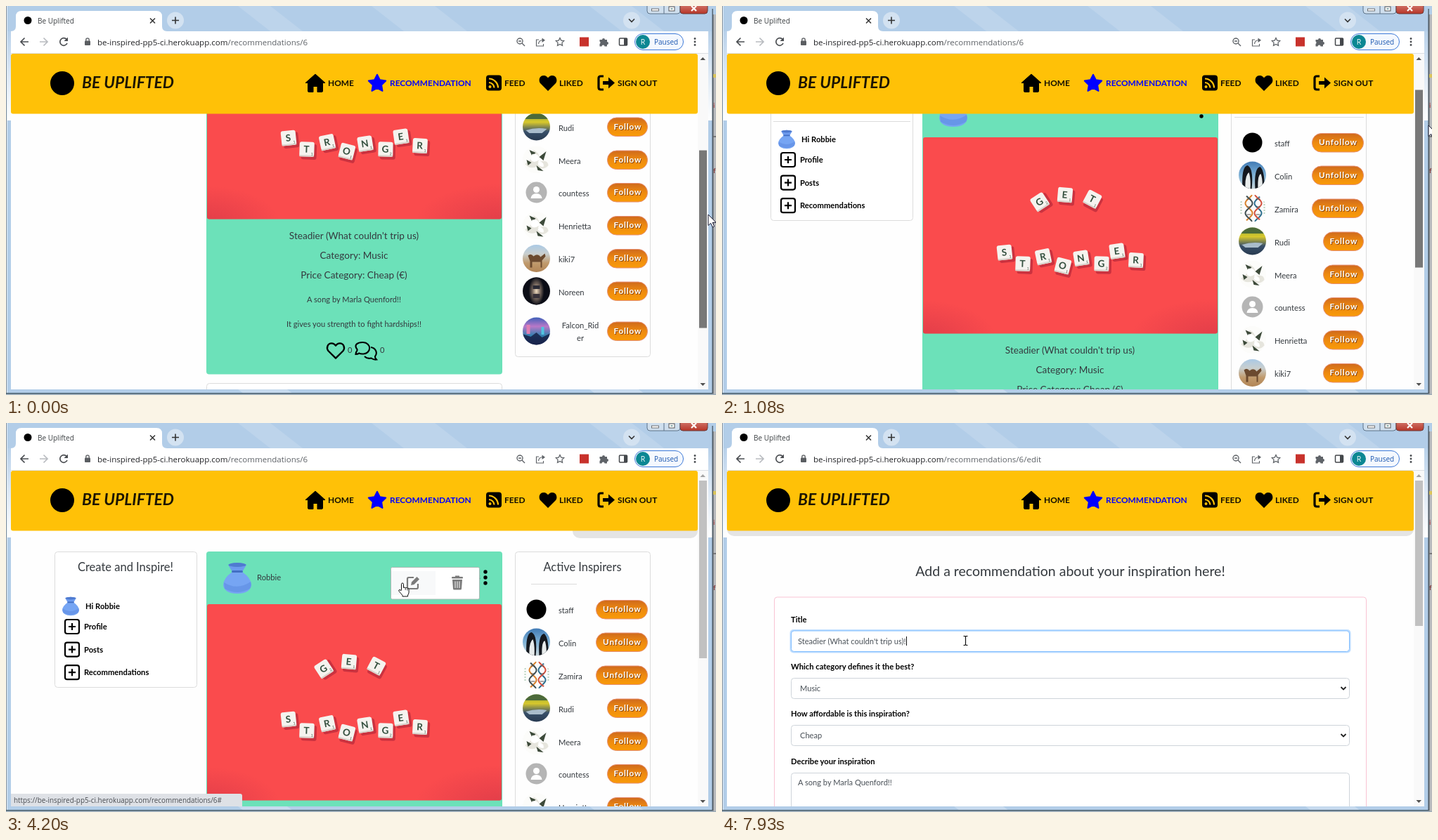
Write an HTML page that moves like this. It is 1010x554 px and loops after 8 s.

```html
<!DOCTYPE html>
<html lang="en">
<head>
<meta charset="utf-8">
<title>Be Uplifted</title>
<style>
html,body{margin:0;width:100%;height:100%;overflow:hidden;background:#fff}
svg{display:block;width:1010px;height:554px;font-family:Lato,sans-serif}
.ui{font-family:"Open Sans","Noto Sans",sans-serif}
.b{font-weight:700}
.m{text-anchor:middle}
.e{text-anchor:end}
text{white-space:pre}
</style>
</head>
<body>
<svg id="stage" viewBox="0 0 1010 554" xmlns="http://www.w3.org/2000/svg"></svg>
<script>
const INK = '#34393e', SONG = "Steadier (What couldn't trip us)", ME = 'Robbie';
const URL_HOST = 'be-inspired-pp5-ci.herokuapp.com', URL_PATH = '/recommendations/6';

// markup helpers
const text = (x, y, s, size = 11.1, cls = '', fill = INK, more = '') =>
  `<text x="${x}" y="${y}" font-size="${size}" class="${cls}" fill="${fill}" ${more}>${s}</text>`;
const rect = (x, y, w, h, fill, r = 0, more = '') =>
  `<rect x="${x}" y="${y}" width="${w}" height="${h}" rx="${r}" fill="${fill}" ${more}/>`;
const box = (x, y, w, h, stroke, r = 4, fill = '#fff', more = '') =>
  rect(x + .5, y + .5, w - 1, h - 1, fill, r, `stroke="${stroke}" ${more}`);
const circle = (x, y, r, fill, more = '') => `<circle cx="${x}" cy="${y}" r="${r}" fill="${fill}" ${more}/>`;
const path = (d, fill = 'none', more = '') => `<path d="${d}" fill="${fill}" ${more}/>`;
const line = (d, stroke, w = 1, more = '') => path(d, 'none', `stroke="${stroke}" stroke-width="${w}" ${more}`);
const group = (x, y, body, more = '') => `<g transform="translate(${x} ${y}) ${more}">${body}</g>`;
const grad = (id, ...stops) => `<linearGradient id="${id}" x2="0" y2="1">` +
  stops.map((c, i) => `<stop offset="${i / (stops.length - 1)}" stop-color="${c}"/>`).join('') + '</linearGradient>';

const HEART = 'M0 11L-11 0C-14-4-12-11-6-11C-3-11-1-9 0-7.5C1-9 3-11 6-11C12-11 14-4 11 0Z';

const defs = `<defs>
${grad('edge', '#b8d1ea', '#dfeaf5', '#ffffff')}
${grad('btn', '#cf6a1c', '#ee8a10', '#f99b08')}
${grad('shut', '#d98a80', '#b73527')}
${grad('field', '#7d9a3c', '#d9c92c', '#39506a', '#27394f')}
${grad('sea', '#3f79b4', '#7fb2d6', '#c9d6da')}
${grad('sand', '#a9c9e6', '#c9cfcf', '#c09a6c', '#b18455')}
${grad('neon', '#3a5fb8', '#b978c8', '#2f7fae', '#1b2554')}
<radialGradient id="dusk"><stop offset="0" stop-color="#cf3346" stop-opacity=".6"/><stop offset="1" stop-color="#cf3346" stop-opacity="0"/></radialGradient>
<radialGradient id="lamp"><stop offset="0" stop-color="#f0dcc0"/><stop offset=".5" stop-color="#77685e"/><stop offset="1" stop-color="#0b0d16"/></radialGradient>
<clipPath id="view"><rect x="7" y="68" width="977" height="478"/></clipPath>
<clipPath id="round"><circle r="19.5"/></clipPath>
<clipPath id="photo"><rect x="286" y="258" width="419" height="279.500" rx="3"/></clipPath>
</defs>`;

const pouch = (x, y, s) => group(x, y,
  path('M-7-9Q-20 0-20 10Q-18 22 0 22Q18 22 20 10Q20 0 7-9Z', '#76a5f3') +
  path('M-19 6Q0 18 19 5Q21 10 18 15Q0 25-18 15Z', '#5c8be0', 'opacity=".55"') +
  path('M-13-19Q0-25 13-19L7-9H-7Z', '#6d9bee') +
  '<ellipse cy="-19" rx="12.5" ry="3" fill="#4f7bd0"/>' +
  rect(-8, -11, 16, 3, '#426fc4', 1.5), `scale(${s})`);

// browser window
function chrome() {
  let s = rect(0, 0, 1010, 554, '#b2cde8');
  for (const [x, w] of [[330, 46], [520, 90], [830, 60]])
    s += path(`M${x} 0h${w}l46 36h${-w}z`, '#fff', 'opacity=".14"');
  s += rect(1, 36, 6, 127, 'url(#edge)') + rect(999, 36, 6, 127, 'url(#edge)');
  for (const x of [330, 830]) s += path(`M${x} 546h70l8 6h-70z`, '#fff', 'opacity=".25"');
  // window outline and the shadow it casts
  s += rect(1005, 12, 5, 541, '#b9bbbe') + rect(1005, 12, 2, 541, '#8d9196') +
    rect(0, 0, 1, 554, '#7d8c9a') + rect(1, 0, 1, 551, '#e3eef8') +
    rect(0, 551, 1005, 1.5, '#39505f') + rect(0, 552.5, 1010, 1.5, '#9fadb8') +
    rect(1004.5, 4, 1.2, 548, '#3c4a55') +
    rect(1006, 97, 4, 5, '#d9c35a') + rect(1006, 185, 4, 2, '#777') +
    text(1006, 145, 'i', 10, '', '#a33') + text(1006, 238, 'f', 10, '', '#722');
  // caption buttons
  s += rect(912, -6, 47, 17, '#cfdfee', 4, 'stroke="#5c7288"') + line('M936 0V11', '#5c7288') +
    rect(959, -6, 39, 17, 'url(#shut)', 4, 'stroke="#6b3a38"') +
    rect(918.5, 4, 10, 3, '#fff', 0, 'stroke="#555" stroke-width=".8"') +
    rect(943, 1, 8, 6, '#fff', 0, 'stroke="#555"') + rect(945.5, 3, 3, 2, '#8aa') +
    line('M975 0L982 7M982 0L975 7', '#fff', 2.2);
  // tab strip
  s += path('M7 36Q14 36 14 29V15Q14 7 22 7H214Q222 7 222 15V29Q222 36 229 36Z', '#fff') +
    circle(31, 20.5, 5.5, '#000') + text(45, 24.5, 'Be Uplifted', 10, 'ui', '#3c4043') +
    line('M205 17.5L212 24.5M212 17.5L205 24.5', '#333', 1.5) +
    circle(241, 20.5, 12, '#d3e2f1') + line('M236 20.5H246M241 15.5V25.5', '#333', 1.6) +
    circle(890, 20.5, 12, '#d3e2f1') + line('M886 18.5L890 22.5L894 18.5', '#333', 1.6);
  // toolbar
  s += rect(7, 36, 992, 510, '#fff') + rect(7, 67, 992, 1, '#dcdfe3') +
    line('M32 51H21M26.5 45.5L21 51L26.5 56.5', '#4a4d51', 1.7) +
    line('M48 51H59M53.5 45.5L59 51L53.5 56.5', '#b9bcc0', 1.7) +
    line('M86.5 48A5.3 5.3 0 1 0 87 53', '#4a4d51', 1.7) + path('M88 44.5V50H82.5Z', '#4a4d51') +
    rect(112, 49.5, 8, 6.5, '#5a5d61', 1) + line('M113.8 50V48a2.2 2.2 0 0 1 4.4 0V50', '#5a5d61', 1.3) +
    `<text x="130" y="55.5" font-size="11.55" class="ui" fill="#202124">${URL_HOST}<tspan fill="#5f6368">${URL_PATH}<tspan id="tail"></tspan></tspan></text>` +
    circle(731, 50, 4, 'none', 'stroke="#5f6368" stroke-width="1.4"') + line('M734 53L738 57M729 50H733', '#5f6368', 1.4) +
    line('M758 48H754.5V57H764.5V54M757.5 54Q758 48.5 764 48.5', '#5f6368', 1.2) + path('M762.5 45.5L767 48.8L762.5 52Z', '#5f6368') +
    line(star(788, 51.5, 6), '#5f6368', 1.3) +
    rect(816, 44.5, 13, 13, '#c8322c') +
    path('M844.5 48H848a2 2 0 1 1 4 0H855V51a2 2 0 1 1 0 4V57.5H851.5a2 2 0 0 0-4 0H844.5V54a2 2 0 0 0 0-3.5Z', '#5f6368') +
    rect(872.5, 46, 11, 10, 'none', 1, 'stroke="#44474b" stroke-width="1.5"') + rect(879, 46, 5, 10, '#44474b') +
    rect(894.5, 39.5, 69, 23, '#f4f8fe', 11.5, 'stroke="#3b78d8"') +
    circle(906, 51, 10, '#0b8793') + text(906, 54.8, 'R', 10.5, 'ui m', '#fff') +
    text(922, 55, 'Paused', 10, 'ui', '#1a56b0');
  for (const y of [46.5, 51, 55.5]) s += circle(980, y, 1.4, '#4a4d51');
  return s;
}

function star(x, y, r) {
  let d = '';
  for (let i = 0; i < 10; i++) {
    const a = i * Math.PI / 5, q = i % 2 ? r * .5 : r;
    d += `${i ? 'L' : 'M'}${(x + q * Math.sin(a)).toFixed(1)} ${(y - q * Math.cos(a)).toFixed(1)}`;
  }
  return d + 'Z';
}

function navbar() {
  const label = (x, s, c = '#120e02') => text(x, 114.3, s, 11.9, 'b', c);
  return rect(7, 68, 977, 85.5, '#ffc107', 3) +
    circle(80, 110, 17, '#000') +
    text(108, 117, 'BE UPLIFTED', 22.8, 'b', '#1c1503', 'font-style="italic"') +
    path('M440 97L454 109.5H450.5V121a1.5 1.5 0 0 1-1.5 1.5H443V114.5H437V122.5H431a1.5 1.5 0 0 1-1.5-1.5V109.5H426Z', '#000', 'stroke="#000" stroke-linejoin="round"') +
    label(458, 'HOME') +
    path(star(528, 110.5, 12.8), '#00f', 'stroke="#00f" stroke-width="2" stroke-linejoin="round"') +
    label(546, 'RECOMMENDATION', '#00f') +
    rect(683, 98.5, 22, 22, '#000', 4) + circle(688.5, 115, 2, '#ffc107') +
    line('M687 109a8 8 0 0 1 7.5 7.5M687 103.5a13.3 13.3 0 0 1 13 13', '#ffc107', 2.2) +
    label(709, 'FEED') + group(771, 110, path(HEART, '#000')) + label(787, 'LIKED') +
    line('M850 100H846Q843 100 843 103V116Q843 119 846 119H850', '#000', 3.2) +
    path('M849 107H857V101.5L866 109.5L857 117.5V112H849Z', '#000') + label(870, 'SIGN OUT');
}

function tile(x, y, turn, letter, n) {
  return group(x, y, rect(-8, -7.5, 22, 22, '#b8283a', 3, 'opacity=".7"') +
    rect(-10.5, -10.5, 21, 21, '#f5f3ef', 3) + rect(-10.5, 8.5, 21, 2, '#d9d2cb', 1) +
    text(-.5, 4.6, letter, 13.5, 'b m', '#34503f') + text(6, 8.2, n, 5, '', '#34503f'), `rotate(${turn})`);
}

function photo() {
  const tiles = [[452, 350, -33, 'G', 2], [488, 340, 5, 'E', 1], [527, 346, 28, 'T', 1],
    [402, 422, -6, 'S', 1], [428, 438, 2, 'T', 1], [457, 428, -12, 'R', 1], [485, 441, 14, 'O', 1],
    [511, 430, -9, 'N', 1], [540, 438, 1, 'G', 2], [562, 420, -8, 'E', 1], [589, 433, 3, 'R', 1]];
  return '<g clip-path="url(#photo)">' + rect(285, 257, 422, 282, '#fa4b4d') +
    '<ellipse cx="285" cy="545" rx="105" ry="55" fill="url(#dusk)"/><ellipse cx="706" cy="545" rx="125" ry="58" fill="url(#dusk)"/>' +
    tiles.map(a => tile(...a)).join('') + '</g>';
}

const flower = rect(-20, -20, 40, 40, '#fcfcfa') +
  path('M-4-14Q8-8 2 4Q16-2 17 8Q10 16 0 10Q-10 14-16 6Q-8 0-6-4Z', '#e6e5dd') +
  path('M-10-14L-1-10L-6-5ZM4-4L14-12L10 1ZM0 8L10 16L2 15ZM-14 0L-7 4L-12 8Z', '#3d4a3a') +
  path('M-6-8Q4-10 4 0Q-4 6-8 0ZM4 2Q12 4 10 10Q4 10 2 6Z', '#fff');
const full = f => rect(-20, -20, 40, 40, f);
const strand = (x, c) => [0, 1].map(k => {
  let d = '';
  for (let y = -19; y < 20; y++) d += `${d ? 'L' : 'M'}${(x + 5 * Math.sin(y / 4.5 + k * Math.PI)).toFixed(1)} ${y}`;
  return line(d, c[k], 2);
}).join('') + line(`M${x - 3}-13h6M${x - 3}-2h6M${x - 3} 9h6`, '#555', 1);

const people = [
  ['staff', 265.5, circle(0, 0, 14, '#000'), 1],
  ['Colin', 312, full('url(#sea)') + path('M-14 20Q-16-12-7-14Q2-10-1 20ZM4 20Q2-10 11-12Q18-6 17 20Z', '#14181f') + path('M-10 20Q-11 0-5-4Q-2 4-3 20ZM8 20Q7 0 12-2Q15 6 14 20Z', '#e8ecec'), 1],
  ['Zamira', 359, full('#fcfcfb') + strand(-5, ['#d9822c', '#3f4f52']) + strand(8, ['#2d6f8f', '#d24f3c']) + line('M-16-10v20M17-10v20', '#b9d3c0', 2, 'stroke-dasharray="2 2"'), 1],
  ['Rudi', 406, full('url(#field)') + path('M-15 5Q0 0 15 3L8 9H-10Z', '#a9bccb') + rect(-20, -20, 40, 9, '#4c6a3a')],
  ['Meera', 453, flower],
  ['countess', 499.5, circle(0, 0, 15, '#b5b5b5') + circle(0, -4, 4.5, '#fff') + path('M-8 8.5Q-7 1.5 0 1.5Q7 1.5 8 8.5Z', '#fff')],
  ['Henrietta', 546.5, flower],
  ['kiki7', 593.5, full('url(#sand)') + path('M-12-4Q-8-8-4-3Q2-8 6-2L12-7L13-3L8 3V13H6V5H-6V13H-9V4Z', '#6b4a2f')],
  ['Noreen', 640, full('#0b0d16') + '<ellipse rx="11" ry="20" fill="url(#lamp)"/>' + rect(-5, -8, 10, 5, '#2a2a35') + rect(-5, 4, 10, 6, '#38323a')],
  ['Falcon_Rid', 697, full('url(#neon)') + path('M-20 20V4L-8 8L0 2L8 9L20 3V20Z', '#182148', 'opacity=".85"') + rect(-14, -9, 5, 13, '#e07fb4') + rect(7, -6, 4, 11, '#4fc4e0')]
];

function button(y, wide) {
  const w = wide ? 74 : 58, x = 913 - w, s = wide ? 'Unfollow' : 'Follow', mid = x + w / 2 + .4;
  const label = (d, c) => text(mid + d, y + 3.5 + d, s, 11.7, 'b m', c, 'letter-spacing=".9"');
  return rect(x + .5, y - 13, w - 1, 26.5, 'url(#btn)', 13, 'stroke="#e58d72"') + label(1, '#8a4510') + label(0, '#fff');
}

function feed() {
  const plus = y => rect(84, y - 10, 20, 20, '#fff', 3, 'stroke="#000" stroke-width="2.2"') + line(`M89 ${y}H99M94 ${y - 5}V${y + 5}`, '#000', 2.2);
  let s = box(69, 183, 203, 194, '#dcdcdc') + text(170, 210.5, 'Create and Inspire!', 16.5, 'm') +
    '<g id="rules">' + line('M73 235.5H268M729 229.5H913', '#dcdcdc') + '</g>' +
    pouch(92, 261, .6) + text(113, 264.5, 'Hi ' + ME, 11.2, 'b', '#000');
  ['Profile', 'Posts', 'Recommendations'].forEach((n, i) => {
    const y = 290 + i * 32.6;
    s += plus(y) + text(111, y + 4, n, 11.2, 'b', '#000');
  });
  s += rect(285, 183, 421, 575.5, '#6ce1b9', 4) + pouch(329, 221, 1) + text(357, 223.5, ME, 11.2) +
    text(675, 223.5, '28 Jan 2023', 11.2, 'e');
  for (const y of [212, 220, 228]) s += circle(682, y, 2.7, '#000');
  s += photo() + text(495, 565.5, SONG, 13.6, 'm') + text(495, 594, 'Category: Music', 13.6, 'm') +
    text(495, 622, 'Price Category: Cheap (€)', 13.6, 'm') + text(495, 656, 'A song by Marla Quenford!!', 11.1, 'm') +
    text(495, 691, 'It gives you strength to fight hardships!!', 11.1, 'm') +
    group(469, 725, path(HEART, 'none', 'stroke="#000" stroke-width="2.4" stroke-linejoin="round"'), 'scale(.97)') +
    text(486, 728, '0') + text(532, 728, '0') +
    line('M498 727Q500 725 499.5 723C494 716 501 713 507 713C521 713 520 730 507 729.5Q504 729.5 502.5 728.5Q500 730 497.5 730Z', '#000', 2.1) +
    line('M510 733Q514 737 519.5 735.5Q523 738 527 737.5Q524.5 735 525 733C529 728 526 721 519 720', '#000', 2.1);
  s += box(285, 771, 421, 160, '#dcdcdc') + box(290, 788, 411, 110, '#e9df4e') + pouch(322, 820, .85) +
    box(346, 797, 347, 48, '#ced4da', 3) + text(356, 815.5, 'Add a comment...', 11.1, '', '#6c757d') +
    line('M685 842L691 836M688.5 842L691 839.5', '#777', .9);
  s += box(724, 183, 193, 551, '#dcdcdc', 4, 'none') + text(820, 210.5, 'Active Inspirers', 16.4, 'm') +
    '<g id="stub">' + line('M747 229.5H812', '#dcdcdc') + '</g>';
  people.forEach(([name, y, art, on], i) => {
    const last = i === people.length - 1;
    s += `<g transform="translate(754.5 ${y})" clip-path="url(#round)">${art}</g>` + button(y, on) +
      (last ? text(817, 693, name, 11.2, 'm') + text(817, 711, 'er', 11.2, 'm') : text(786, y + 5.7, name, 11.2));
  });
  s += '<g id="menu">' + rect(547.5, 205.5, 126, 45.5, '#fff', 2, 'stroke="#a9b8b2"') +
    rect(548, 211, 63, 34, '#fff', 0, 'id="edit"') +
    line('M580 220H573Q571 220 571 222V234Q571 236 573 236H584Q586 236 586 234V229', '#7b7b7b', 2.2) +
    path('M576 231L577 226.5L584.5 219L588 222.5L580.5 230Z', '#7b7b7b') +
    rect(634, 219, 16, 2.5, '#7b7b7b', 1) + rect(639, 217.5, 6, 2, '#7b7b7b') +
    path('M635 223H649L648 236Q648 237.5 646.5 237.5H637.5Q636 237.5 636 236Z', '#7b7b7b') +
    line('M639 225.5V235M642 225.5V235M645 225.5V235', '#fff', 1) + '</g>';
  return s;
}

function form() {
  const label = (y, s) => text(98, y, s, 11.2, 'b', '#000');
  const chevron = y => line(`M880.5 ${y - 2}L884 ${y + 1.5}L887.5 ${y - 2}`, '#222', 1.8);
  const value = (x, y, id) => text(x, y, '', 11.1, '', '#495057', `id="${id}"`);
  return text(495.5, 217.5, 'Add a recommendation about your inspiration here!', 19.5, 'm') +
    box(74, 247.5, 843, 420, '#f9c3d3') + label(284, 'Title') + label(351, 'Which category defines it the best?') +
    label(418, 'How affordable is this inspiration?') + label(485.5, 'Decribe your inspiration') +
    '<rect id="ring" x="96.5" y="294" width="798" height="33.5" rx="5" fill="#bfdeff"/>' +
    box(98, 295.5, 795, 30.5, '#ced4da', 4, '#fff', 'id="field1"') + box(98, 363, 795, 30, '#ced4da') +
    box(98, 430, 795, 30, '#ced4da') + box(98, 498, 795, 100, '#ced4da') + chevron(378) + chevron(445) +
    value(108, 314.5, 'v0') + value(111, 382, 'v1') + value(111, 449, 'v2') + value(108, 515.5, 'v3') +
    rect(0, 304, 1, 13, '#111', 0, 'id="caret"');
}

const cursors = {
  arrow: path('M0 0V15.5L3.6 12.3L6.2 18L8.6 17L6.1 11.3H11Z', '#fff', 'stroke="#1b1b33"'),
  hand: path('M-1.5 9V1.5a1.5 1.5 0 0 1 3 0V6.5q1.5-1 3 .2q1.6-.7 2.6.6q2-.3 2 1.8V13q0 2-1.5 4V19H0V17.5q-2-2.5-5-6q-.8-2 1-2q1 0 2 1.3z', '#fff', 'stroke="#111"') + line('M4.2 7V10M7 8V10.5', '#111', .8),
  beam: line('M-3-6.5H-1L0-5.5L1-6.5H3M0-5.5V5.5M-3 6.5H-1L0 5.5L1 6.5H3', '#111', 1.2)
};

const svg = document.getElementById('stage');
svg.innerHTML = defs + chrome() + '<g clip-path="url(#view)">' + rect(7, 68, 977, 478, '#fefefe') +
  `<g id="feed">${feed()}</g><g id="form">${form()}</g>` +
  rect(7, 140, 977, 21, '#e4e4e4', 10, 'id="shade"') + navbar() + '</g>' +
  rect(984, 68, 15, 478, '#f9f9f9') + path('M987.5 77H995L991.25 73Z', '#505050', 'id="up"') +
  path('M987.5 537H995L991.25 541Z', '#505050') + rect(986, 82, 11, 253, '#787878', 0, 'id="thumb"') +
  '<g id="status">' + path('M7 528H333Q336 528 336 531V546H7Z', '#dee1e6') +
  text(11, 541, `https://${URL_HOST}${URL_PATH}#`, 9.9, 'ui', '#4a4d52') + '</g>' +
  Object.entries(cursors).map(([k, v]) => `<g id="${k}">${v}</g>`).join('');

const $ = id => document.getElementById(id);
const show = (id, on) => $(id).setAttribute('display', on ? 'inline' : 'none');
const set = (id, o) => { for (const k in o) $(id).setAttribute(k, o[k]); };

// value of the last step reached
const at = (t, steps) => steps.reduce((v, [s, x]) => t >= s ? x : v, steps[0][1]);

const scrolls = [[0, 234], [60, 268], [160, 316], [710, 295], [770, 272], [1020, 160], [1080, 71],
  [1140, 40], [1200, 22], [1260, 10], [1340, 4], [1440, 0]];
// start, end, steps, from, bend, to
const legs = [
  [1620, 2210, 10, [1005, 148], [830, 290], [669.5, 217]],
  [2970, 3090, 3, [669.5, 217], [676, 219], [683, 222.5]],
  [3780, 4200, 8, [683, 222.5], [620, 220], [564, 228]],
  [4860, 5340, 8, [564, 228], [480, 260], [400, 306]],
  [5590, 5700, 3, [400, 306], [372, 309], [346.5, 310]]
];

function pointer(t) {
  if (t < 1620) return at(t, [[0, [999, 297]], [60, [1003, 306]], [160, null], [1080, [1005, 170]], [1140, [1007, 156]], [1200, null]]);
  const leg = legs.filter(l => t >= l[0]).pop(), [a, b, n, p, q, r] = leg;
  const k = Math.min(n, 1 + Math.floor((t - a) / (b - a) * (n - 1) + 1e-6)) / n;
  const u = k * (3 - k) / 2;
  return [0, 1].map(i => (1 - u) ** 2 * p[i] + 2 * u * (1 - u) * q[i] + u * u * r[i]);
}

function draw(t) {
  const editing = t >= 4590, y = editing ? 0 : at(t, scrolls), filled = t >= 5000;
  show('feed', !editing);
  show('form', editing);
  set('feed', { transform: `translate(0 ${-y})` });
  show('rules', y > 0);
  show('stub', y === 0);
  show('menu', t >= 3520);
  set('edit', { fill: t >= 4340 ? '#007bff' : t >= 4020 ? '#f8f9fa' : '#fff' });
  $('tail').textContent = editing ? '/edit' : '';
  show('status', t >= 3900 && t < 5100);
  show('shade', t >= 2000);
  const left = editing ? (t < 4860 ? 69 : 7) : 806;
  set('shade', { x: left, width: 984 - left, height: editing ? 21 : 24 });
  set('thumb', { y: 82 + y * .528, height: editing ? 207 : 253, fill: t < 1440 ? '#787878' : '#c1c1c1' });
  set('up', { fill: y ? '#505050' : '#a3a3a3' });

  const vals = filled ? [SONG + (t >= 7930 ? '!' : ''), 'Music', 'Cheap', 'A song by Marla Quenford!!']
    : ['Enter a title', 'Select a category', 'Select a price-category',
      'Describe in a few words about the inspiration you get and how it impacted your life..'];
  vals.forEach((v, i) => {
    $('v' + i).textContent = v;
    set('v' + i, { fill: filled || i % 3 ? '#495057' : '#6c757d' });
  });
  set('ring', { opacity: at(t, [[0, 0], [6010, .15], [6070, .4], [6130, .75], [6190, 1]]) });
  set('field1', { stroke: t >= 6010 ? '#80bdff' : '#ced4da' });
  const blink = t >= 6010 && t < 6560 || t >= 7050 && t < 7560 || t >= 7930;
  show('caret', blink);
  if (blink) set('caret', { x: Math.round(108.5 + $('v0').getComputedTextLength()) });

  const p = pointer(t);
  const kind = !p ? '' : editing ? (p[1] > 296 ? 'beam' : 'arrow') : t >= 2970 && p[0] > 677 || t >= 3780 ? 'hand' : 'arrow';
  for (const k in cursors) show(k, k === kind);
  if (p) set(kind, { transform: `translate(${p[0].toFixed(1)} ${p[1].toFixed(1)})` });
}

const start = performance.now();
function tick() {
  draw((performance.now() - start) % 8000);
  requestAnimationFrame(tick);
}
tick();
</script>
</body>
</html>
```
